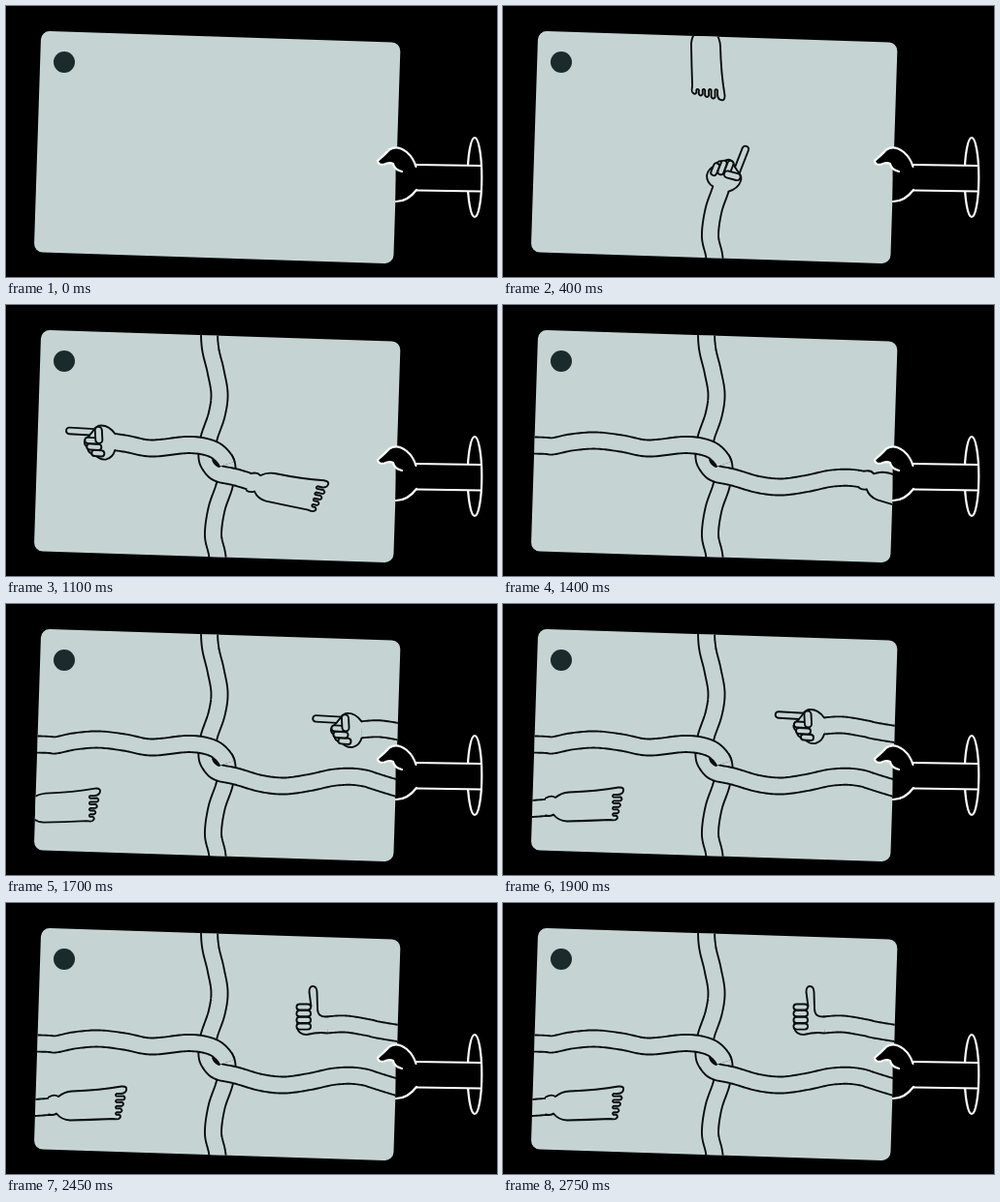
Recreate the animation shown at these times as an HTML page with a canvas. Size 506 by 280 pixels, loop 2850 ms.

```html
<!DOCTYPE html>
<html lang="en">
<head>
<meta charset="utf-8">
<title>Linked arms</title>
<style>
  html, body { margin: 0; width: 100%; height: 100%; overflow: hidden; background: #000; }
  canvas { display: block; width: 506px; height: 280px; }
</style>
</head>
<body>
<canvas id="stage"></canvas>
<script>
const LOOP = 2850, W = 506, H = 280;
const SKIN = '#c5d4d3', INK = '#080c0d', WHITE = '#fff';
const canvas = document.getElementById('stage');
const ctx = canvas.getContext('2d');
const ratio = window.devicePixelRatio || 1;
canvas.width = W * ratio;
canvas.height = H * ratio;

// Smooth curve through points, addressable by arc length.
function curve(points) {
  const samples = [];
  let length = 0;
  for (let i = 0; i < points.length - 1; i++) {
    const [a, b, c, d] = [-1, 0, 1, 2].map(o =>
      points[Math.max(0, Math.min(points.length - 1, i + o))]);
    for (let n = 0; n < 16; n++) {
      const u = n / 16;
      const p = [0, 1].map(k => b[k] + u / 2 * (c[k] - a[k] +
        u * (2 * a[k] - 5 * b[k] + 4 * c[k] - d[k] + u * (3 * (b[k] - c[k]) + d[k] - a[k]))));
      const last = samples[samples.length - 1];
      if (last) length += Math.hypot(p[0] - last.x, p[1] - last.y);
      samples.push({ x: p[0], y: p[1], s: length });
    }
  }
  const at = s => {
    let i = samples.findIndex(p => p.s > s);
    if (i < 0) i = samples.length - 1;
    i = Math.max(1, i);
    const p = samples[i - 1], q = samples[i];
    const u = (s - p.s) / (q.s - p.s);
    return { x: p.x + (q.x - p.x) * u, y: p.y + (q.y - p.y) * u };
  };
  return { length, at };
}

const footRoute = curve([[210, -80], [210, 0], [210, 40], [216, 68], [220, 92], [217, 114],
  [209, 138], [207, 157], [211, 167], [219, 174], [237, 178], [263, 185.5], [287, 188],
  [313, 184.5], [340, 179], [367, 179.5], [402, 190], [600, 250]]);
const handRoute = curve([[219, 370], [219, 300], [218, 261], [213.5, 238], [217, 211],
  [225, 187], [228, 168], [223, 156.5], [211, 148], [188, 144.5], [150, 148], [122, 143],
  [95, 140], [70, 142], [50, 146], [32, 145], [-100, 143]]);
const enteringArm = curve([[600, 165], [404, 134.5], [375, 129], [350, 125], [330, 126]]);
const enteringLeg = curve([[-150, 224], [30, 211.5], [52, 209]]);
const CROSSING = 208;

// Rows: time, distance along the route, heading in degrees.
const FOOT_KEYS = [[0, 30], [400, 105], [800, 230], [1200, 326], [1400, 423], [1600, 510]];
const HAND_KEYS = [[0, 50, -95], [400, 184, -72], [600, 217, -165], [800, 234, -180],
  [1200, 366, -180], [1400, 440, -180], [1600, 500, -180]];

function track(keys, t, column) {
  const i = keys.findIndex(k => k[0] > t);
  if (i < 0) return keys[keys.length - 1][column];
  const a = keys[i - 1], b = keys[i];
  return a[column] + (b[column] - a[column]) * (t - a[0]) / (b[0] - a[0]);
}

function tube(route, from, to) {
  ctx.beginPath();
  for (let s = from; s < to; s += 2) {
    const p = route.at(s);
    ctx.lineTo(p.x, p.y);
  }
  const end = route.at(to);
  ctx.lineTo(end.x, end.y);
  ctx.lineCap = 'butt';
  outline(19, 15.2);
}

function outline(outer, inner) {
  ctx.lineWidth = outer;
  ctx.strokeStyle = INK;
  ctx.stroke();
  ctx.lineWidth = inner;
  ctx.strokeStyle = SKIN;
  ctx.stroke();
}

function capsule(x1, y1, x2, y2, size = 8) {
  ctx.beginPath();
  ctx.moveTo(x1, y1);
  ctx.lineTo(x2, y2);
  ctx.lineCap = 'round';
  outline(size, size - 3.8);
}

function shape(d, fill = SKIN, stroke = INK, width = 1.9) {
  const path = new Path2D(d);
  ctx.fillStyle = fill;
  ctx.fill(path);
  ctx.strokeStyle = stroke;
  ctx.lineWidth = width;
  ctx.lineCap = ctx.lineJoin = 'round';
  ctx.stroke(path);
}

function place(p, degrees, draw) {
  ctx.save();
  ctx.translate(p.x, p.y);
  ctx.rotate(degrees * Math.PI / 180);
  draw();
  ctx.restore();
}

function foot() {
  let toes = '';
  for (let i = 0; i < 4; i++) {
    const y = -12 + i * 6.4, tip = 71 - i * 1.5;
    toes += `L62,${y} Q60,${y + 1.5} 62,${y + 2.6} L${tip - 2},${y + 2.4}
      Q${tip + 1},${y + 4.5} ${tip - 2},${y + 6.4}`;
  }
  shape(`M-8,-8.5 Q-2,-12 2,-9 Q8,-14 16,-14.5 Q45,-15.5 67,-19.5
    Q74,-20 71.5,-14.5 Q70,-12 66,-12 ${toes}
    Q64,15 58,14 Q35,15 14,15.5 Q5,15 0,8.5 Q-4,11 -8,9.5`);
}

function pointingHand(reach = 46) {
  capsule(20, 10, reach, 11.5, 8.5);
  shape('M-1,8.5 C3,14 8,17 13,17 C18,17 20,14 21,12 L25,7 L30,2 ' +
    'Q32,-2 27,-6 Q27,-12 20,-13 Q15,-19 8,-18 Q1,-16 -1,-8.5');
  capsule(13, -12, 20, -11.5);
  capsule(16, -5.5, 25, -5);
  capsule(18, 1, 27, 1.5);
  capsule(16, 12, 15.5, 2, 9);
}

function thumbUp(rise) {
  const tip = -34 * rise;
  shape(`M1,-8.5 C-6,-8 -9,-11 -9,-17 L-9.5,${tip} C-10,${tip - 8} -18,${tip - 8} -17.5,${tip}
    L-15.5,-19 L-28,-18 L-30,3 Q-28,10 -20,10 Q-8,7 1,8.5`);
  for (let i = 3; i >= 0; i--) capsule(-27.5, -18.5 + i * 6.7, -19, -18.5 + i * 6.7);
}

function card() {
  ctx.beginPath();
  ctx.roundRect(-185.3, -114.3, 370.6, 228.6, 9);
}

function linkedArms(t) {
  const handAt = track(HAND_KEYS, t, 1), footAt = track(FOOT_KEYS, t, 1);
  tube(handRoute, 0, Math.min(handAt, CROSSING + 6));
  tube(footRoute, 0, footAt);
  const ankle = footRoute.at(footAt), ahead = footRoute.at(footAt + 4);
  place(ankle, Math.atan2(ahead.y - ankle.y, ahead.x - ankle.x) * 180 / Math.PI, foot);
  if (handAt > CROSSING) tube(handRoute, CROSSING, handAt);
  place(handRoute.at(handAt), track(HAND_KEYS, t, 2), () => pointingHand());
  if (handAt > 245) shape('M213,160 Q217,161 220,167 Q215,166 213,160', INK);
}

function enteringLimbs(t) {
  if (t < 1500) return;
  const away = Math.pow(Math.max(0, 1 - (t - 1400) / 500), 1.4);
  place({ x: -98 * away, y: 4 * away }, 0, () => {
    tube(enteringLeg, 0, enteringLeg.length);
    place({ x: 52, y: 209 }, 0, foot);
  });
  place({ x: 128 * away, y: 14 * away }, 0, () => {
    tube(enteringArm, 0, enteringArm.length);
    const wrist = { x: 330, y: 126 };
    if (t < 2000) place(wrist, 180, () => pointingHand());
    else if (t < 2100) place(wrist, 180, () => pointingHand(32));
    else place(wrist, 0, () => thumbUp(t < 2200 ? 0.8 : 1));
  });
}

function holdingHand() {
  shape('M402,168 L408,171 Q400,169 399,163 Q395,161 390,163.5 Q384,165 383,160 ' +
    'Q391,153 395,148.5 Q403,143 413,151 Q421,158 423,166 L423,190 Q414,202 402,202 Z', '#000', '#000', 0.5);
  const line = d => shape(d, 'transparent', WHITE, 2.2);
  line('M408,171 Q400,169 399,163 Q395,161 390,163.5 Q384,165 383,160 ' +
    'Q391,153 395,148.5 Q403,143 413,151 Q420,157 422.5,166');
  line('M402,202 Q414,202 423,190');
  ctx.beginPath();
  ctx.ellipse(483, 177, 7.3, 41, 0, 0, 7);
  ctx.stroke();
  ctx.fillStyle = '#000';
  ctx.fillRect(470, 164, 18.5, 28);
  line('M423,164 L488.5,165 M423,190.5 L488.5,191.5');
}

function render(now) {
  const t = Math.floor((now % LOOP) / 100) * 100;
  ctx.setTransform(ratio, 0, 0, ratio, 0, 0);
  ctx.fillStyle = '#000';
  ctx.fillRect(0, 0, W, H);
  ctx.save();
  const tilt = 1.86 * Math.PI / 180;
  ctx.translate(217.7, 146);
  ctx.rotate(tilt);
  card();
  ctx.fillStyle = SKIN;
  ctx.fill();
  ctx.clip();
  ctx.rotate(-tilt);
  ctx.translate(-217.7, -146);
  ctx.fillStyle = '#1b2b2c';
  ctx.beginPath();
  ctx.arc(60, 58, 11, 0, 7);
  ctx.fill();
  if (t >= 100) linkedArms(t);
  enteringLimbs(t);
  ctx.restore();
  holdingHand();
}

const start = performance.now();
function tick() {
  render(performance.now() - start);
  requestAnimationFrame(tick);
}
tick();
</script>
</body>
</html>
```
